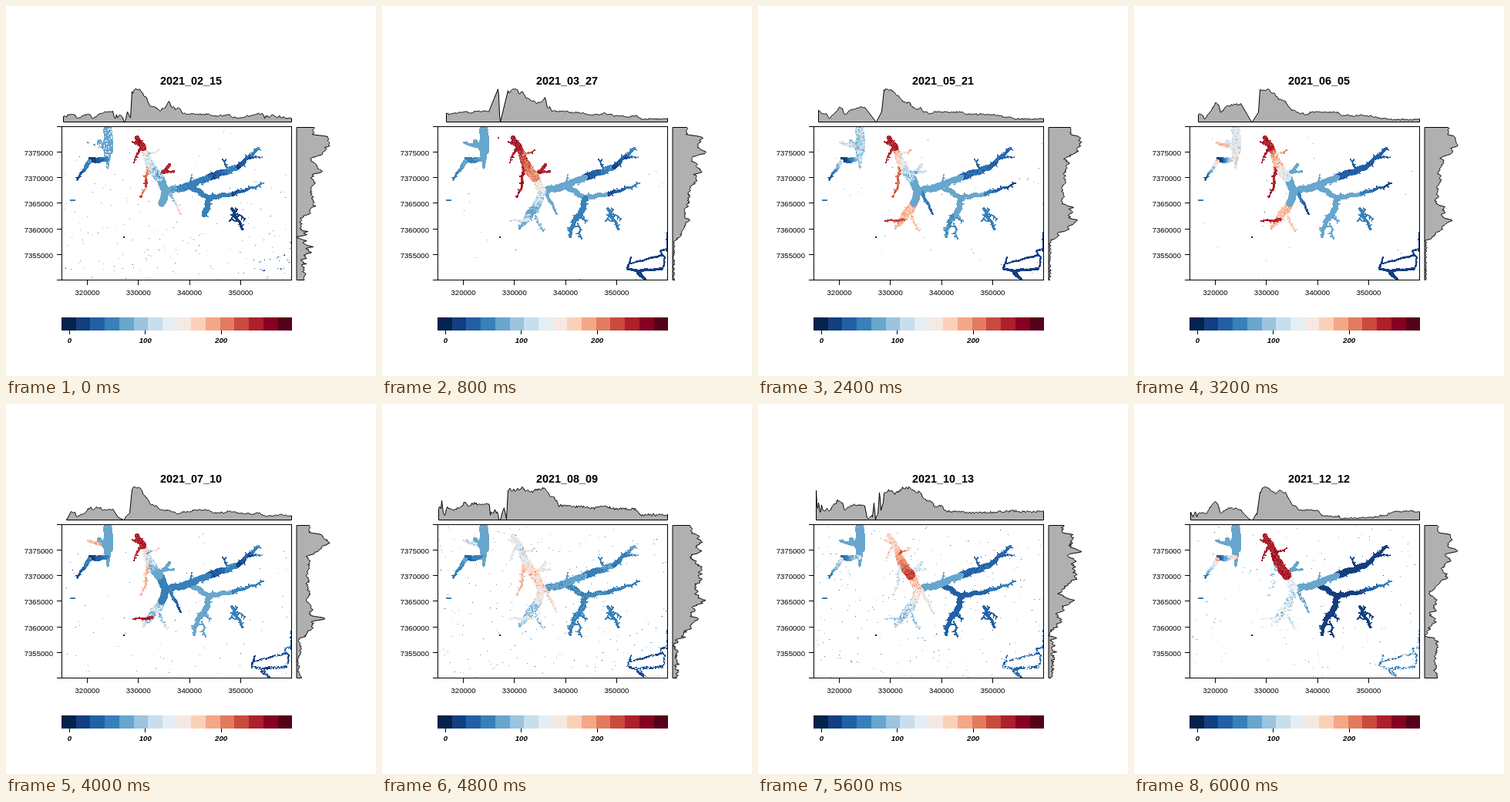
Animation of 480 by 480 pixels, one loop 6.4 s. Source, as an HTML page with a canvas:

```html
<!DOCTYPE html>
<html lang="en">
<head>
<meta charset="utf-8">
<title>Water map time series</title>
<style>
  html, body { margin: 0; width: 100%; height: 100%; overflow: hidden; background: #fff; }
  canvas, svg { position: absolute; left: 0; top: 0; width: 480px; height: 480px; }
  text { font-family: "Liberation Sans", Arial, sans-serif; font-size: 9.6px; text-anchor: middle; }
  #title { font-size: 14.4px; font-weight: bold; }
  .y { text-anchor: end; }
  .key { font-weight: bold; font-style: italic; }
  path { stroke: #000; fill: none; shape-rendering: crispEdges; }
</style>
</head>
<body>
<canvas id="map" width="480" height="480"></canvas>
<svg id="axes" viewBox="0 0 480 480"><text id="title" x="240" y="102"></text></svg>
<script>
const STEP = 400, STEPS = 16;
const ctx = document.getElementById('map').getContext('2d');
const axes = document.getElementById('axes');
const title = document.getElementById('title');
const palette = ['#04224c', '#133f80', '#2260a6', '#3780b9', '#68a6cd', '#9bc4de', '#c7deec', '#e6eef3',
  '#f7e8e1', '#fbd0b9', '#f3a787', '#e27b5e', '#c94a3f', '#ae1f2c', '#850021', '#550019'];

const lerp = (a, b, k) => a + (b - a) * k;
const clamp = (v, lo, hi) => Math.max(lo, Math.min(hi, v));
function hash(x, y, s) {
  const v = Math.sin(x * 12.9898 + y * 78.233 + s * 37.719) * 43758.5453;
  return v - Math.floor(v);
}

// Water bodies: each line is start width, end width, then x,y points.
const cells = new Map();
function stamp(x, y, w, name, t) {
  const r = w / 2;
  for (let j = Math.floor(y - r); j <= y + r; j++)
    for (let i = Math.floor(x - r); i <= x + r; i++)
      if (i > 72 && i < 371 && j > 156 && j < 356 && Math.hypot(i + .5 - x, j + .5 - y) <= Math.max(r, .71))
        cells.set(j * 480 + i, { x: i, y: j, name, t });
}
function water(name, rough, ...lines) {
  for (const [w0, w1, ...p] of lines) {
    const n = p.length / 2 - 1;
    let run = 0;
    for (let k = 0; k < n; k++) {
      const [x0, y0, x1, y1] = p.slice(k * 2, k * 2 + 4);
      const len = Math.hypot(x1 - x0, y1 - y0), ux = (x1 - x0) / len, uy = (y1 - y0) / len;
      for (let d = 0; d < len; d += .5) {
        const t = (k + d / len) / n, w = lerp(w0, w1, t);
        const bend = Math.sin(d / len * Math.PI) * Math.sin(d / 3 + x0) * rough * 1.6;
        const x = x0 + ux * d - uy * bend, y = y0 + uy * d + ux * bend;
        const h = hash(Math.floor(x / 2), Math.floor(y / 2), 1);
        stamp(x, y, w * (1 + (h - .5) * .6 * rough), name, t);
        run += .5;
        if (run < 4.5) continue;
        run = 0;
        const side = hash(x, y, 2) < .5 ? -1 : 1, reach = (w * .6 + 1 + hash(x, y, 3) * 4) * rough;
        const lean = hash(x, y, 4) - .5;
        for (let q = 0; q < reach; q += .5)
          stamp(x + (-uy * side + ux * lean) * q, y + (ux * side + uy * lean) * q, q < reach * .6 ? 2 : 1, name, t);
      }
    }
  }
}
water('lake', .35, [10, 13, 132, 157, 133, 187], [11, 2, 132, 187, 132, 211], [6, 6, 121, 176, 129, 186]);
water('spur', .4, [3, 5, 106, 177, 122, 182]);
water('tail', .5, [6, 7, 132, 199, 110, 200], [6, 2, 108, 202, 92, 226]);
water('pond', 0, [1, 1, 84, 252, 90, 252]);
water('dot', 0, [1, 1, 151, 171, 152, 172]);
water('sink', 0, [1, 1, 153, 300, 154, 300]);
water('river', .3, [2, 4, 323, 326, 318, 341, 336, 344], [4, 3, 336, 343, 364, 341], [6, 3, 333, 346, 342, 355],
  [2, 2, 364, 341, 367, 326, 361, 318, 370, 315], [2, 3, 323, 334, 364, 323], [2, 3, 370, 294, 370, 318]);
water('isle', .8, [4, 3, 293, 263, 307, 290], [2, 2, 290, 279, 300, 264], [2, 1, 298, 270, 311, 276]);
water('tip', .6, [5, 2, 290, 245, 311, 239, 334, 230]);
water('arm', .6, [7, 5, 240, 235, 262, 248, 291, 245]);
water('bay', .8, [7, 4, 257, 271, 249, 279, 244, 299], [2, 2, 254, 282, 259, 302], [3, 1, 258, 273, 267, 280]);
water('gulf', .7, [6, 7, 264, 249, 257, 271]);
water('east', .65, [8, 7, 264, 222, 301, 209], [6, 3, 301, 209, 328, 184], [1, 3, 281, 199, 289, 212],
  [3, 1, 316, 197, 333, 196]);
water('mid', .65, [9, 8, 209, 240, 230, 236, 264, 222], [1, 3, 241, 219, 237, 232]);
water('leg', .4, [5, 2, 212, 241, 227, 270]);
water('south', .65, [9, 10, 203, 255, 190, 273], [8, 3, 190, 273, 178, 289], [3, 1, 199, 272, 209, 293]);
water('hook', .5, [4, 2, 190, 277, 165, 279]);
water('fork', .5, [3, 4, 198, 221, 212, 206], [4, 2, 205, 216, 218, 214]);
water('west', .5, [4, 3, 184, 204, 181, 236], [3, 1, 181, 236, 175, 249]);
water('hub', .5, [11, 9, 197, 220, 208, 240, 202, 256]);
water('neck', .6, [8, 11, 178, 184, 186, 204, 198, 222], [1, 3, 198, 187, 183, 194]);
water('head', .5, [6, 8, 170, 171, 178, 184], [1, 3, 166, 203, 173, 186], [2, 4, 164, 176, 176, 181]);

// Levels along a body: start, end, share of cells that show.
const tone = (from, to = from, cover = 1) => ({ from, to, cover });
const NAVY = tone(1), BLUE = tone(3), SKY = tone(4), MIX = tone(7), PEACH = tone(9.4), RED = tone(13);
const DRY = tone(0, 0, 0), DEEPEN = tone(3.6, 1), LIGHTEN = tone(1, 3.4), COOL = tone(9.5, 4), HEAT = tone(4, 11);
const usual = { head: RED, river: NAVY, sink: tone(0), dot: DRY, isle: BLUE, bay: BLUE, tail: DEEPEN, pond: BLUE };

const scenes = [];
const scene = (step, specks, tones) => scenes.push({ step, specks, tones: { ...usual, ...tones } });
scene(0, 170, {
  lake: tone(4, 4, .75), spur: tone(3, 4, .3), neck: tone(9, 5), west: tone(9, 13), fork: RED, south: DRY, hook: DRY,
  leg: tone(4, 9), mid: tone(4, 2.6), east: LIGHTEN, arm: BLUE, tip: LIGHTEN, gulf: BLUE, bay: DRY, isle: NAVY,
  river: tone(1, 2, .18)
});
scene(2, 25, {
  tail: tone(4, 3), neck: tone(13, 10.5), west: RED, fork: RED, hub: tone(9, 5.5), south: tone(5, 4), hook: MIX,
  east: LIGHTEN, tip: LIGHTEN, gulf: BLUE, dot: RED
});
scene(4, 45, {
  lake: tone(4.6, 4), neck: COOL, west: PEACH, fork: HEAT, south: PEACH, hook: tone(10, 13, .7), leg: BLUE, east: BLUE,
  arm: tone(4, 4, .8), tip: DEEPEN, dot: RED
});
scene(8, 22, {
  lake: MIX, spur: PEACH, tail: tone(9, 1), neck: tone(12, 7), west: RED, south: PEACH, hook: RED, leg: DEEPEN,
  east: tone(1.6, 2), tip: DEEPEN, bay: SKY
});
scene(10, 85, {
  spur: PEACH, neck: COOL, west: PEACH, hub: BLUE, south: tone(4.2, 7), hook: RED, leg: DEEPEN, mid: BLUE,
  east: LIGHTEN, tip: BLUE, bay: SKY, river: tone(1, 2, .7)
});
scene(13, 330, {
  head: SKY, neck: HEAT, west: PEACH, fork: PEACH, hub: tone(12, 9.5), south: tone(6, 4), leg: tone(12, 9.5),
  east: tone(3.2, 4), arm: BLUE, tip: BLUE, gulf: BLUE, tail: tone(4, 3), river: tone(2, 1, .7)
});
scene(15, 150, {
  tail: tone(9.5, 2), neck: RED, west: tone(4, 4, .4), hub: tone(8, 6, .6), south: tone(5, 8, .6), hook: tone(6, 9, .5),
  leg: tone(4, 4, .7), east: NAVY, arm: NAVY, tip: LIGHTEN, gulf: NAVY, bay: NAVY, isle: NAVY, river: tone(3, 4, .6)
});

const dates = ['02_15', '03_07', '03_27', '04_16', '05_01', '05_11', '05_21', '05_26', '06_05', '06_20',
  '07_10', '07_25', '08_09', '08_24', '10_13', '12_12'];

// Collects mean levels per row or column and turns them into heights.
class Mean {
  constructor() { this.sum = []; this.count = []; }
  add(i, v, weight) {
    this.sum[i] = (this.sum[i] || 0) + v * weight;
    this.count[i] = (this.count[i] || 0) + weight;
  }
  heights(seed) {
    const keys = Object.keys(this.sum).map(Number);
    const level = keys.map(i => {
      let s = 0, n = 0;
      for (let d = -1; d <= 1; d++) {
        const f = d ? .4 : 1;
        s += (this.sum[i + d] || 0) * f;
        n += (this.count[i + d] || 0) * f;
      }
      return s / n + (hash(i, 6, seed) - .5) * .5;
    });
    const lo = Math.min(...level), hi = Math.max(...level);
    return keys.map((i, n) => [i, (level[n] - lo) / (hi - lo) * 43]);
  }
}

function profile(points, end, place) {
  ctx.beginPath();
  ctx.moveTo(...place(points[0][0], 0));
  for (const [i, h] of points) ctx.lineTo(...place(i, h));
  ctx.lineTo(...place(end, points[points.length - 1][1]));
  ctx.lineTo(...place(end, 0));
  ctx.closePath();
  ctx.fill();
  ctx.stroke();
}

function draw(step) {
  const b = scenes.find(s => s.step >= step);
  const a = scenes[Math.max(0, scenes.indexOf(b) - (b.step > step))];
  const k = a === b ? 0 : (step - a.step) / (b.step - a.step);
  const seed = step + 5, columns = new Mean(), rows = new Mean();
  ctx.fillStyle = '#fff';
  ctx.fillRect(0, 0, 480, 480);
  title.textContent = '2021_' + dates[step];

  const dot = (x, y, level, weight) => {
    const v = clamp(Math.round(level), 0, 15);
    ctx.fillStyle = palette[v];
    ctx.fillRect(x, y, 1, 1);
    columns.add(x, level, weight);
    rows.add(y, level, weight);
  };

  const specks = lerp(a.specks, b.specks, k);
  for (let i = 0; i < specks; i++) {
    const hue = hash(i, 3, seed), low = step < 2 ? .55 : .9;
    ctx.globalAlpha = .35 + .6 * hash(i, 4, seed);
    dot(Math.floor(73 + hash(i, 1, seed) * 297), Math.floor(158 + 197 * hash(i, 2, seed) ** low),
      hue > .9 && step > 10 ? 10 : hue * 4.5, .35);
  }
  ctx.globalAlpha = 1;

  for (const { x, y, name, t } of cells.values()) {
    const p = a.tones[name] || SKY, q = b.tones[name] || SKY;
    const patch = hash(x >> 1, y >> 1, seed);
    if (patch * .6 + hash(x, y, 9) * .4 > lerp(p.cover, q.cover, k)) continue;
    const level = lerp(lerp(p.from, p.to, t), lerp(q.from, q.to, t), k);
    const mottle = level > 4.8 && level < 9 ? 4.5 : level > 9 ? 2.2 : .9;
    dot(x, y, level + (patch * .5 + hash(x, y, seed) * .5 - .5) * mottle, 1);
  }

  ctx.fillStyle = '#b0b0b0';
  ctx.strokeStyle = '#000';
  ctx.lineWidth = 1;
  ctx.lineJoin = 'round';
  profile(columns.heights(seed), 370, (i, h) => [i + .5, 150.5 - h]);
  profile([[157, rows.heights(seed)[0][1]], ...rows.heights(seed)], 355, (i, h) => [377 + h, i + .5]);

  palette.forEach((c, i) => {
    const x = Math.round(72 + i * 18.7);
    ctx.fillStyle = c;
    ctx.fillRect(x, 404, Math.round(72 + (i + 1) * 18.7) - x, 17);
  });
}

function label(text, x, y, cls = '') {
  axes.insertAdjacentHTML('beforeend', `<text x="${x}" y="${y}" class="${cls}">${text}</text>`);
}
let ticks = 'M72.5 156.5H370.5V355.5H72.5Z';
for (let i = 0; i < 7; i++) {
  const y = Math.round(156.7 + i * 33.2);
  ticks += `M66 ${y - .5}H72`;
  if (i > 0 && i < 6) label(7380000 - i * 5000, 61, y + 4, 'y');
}
for (let i = 0; i < 4; i++) {
  const x = 105.5 + i * 66.3;
  ticks += `M${Math.floor(x) + .5} 356V362`;
  label(320000 + i * 10000, x, 375);
}
for (let i = 0; i < 3; i++) {
  const x = 82.5 + i * 98.3;
  ticks += `M${Math.floor(x) + .5} 421V426`;
  label(i * 100, x, 437, 'key');
}
axes.insertAdjacentHTML('beforeend', `<path d="${ticks}"/>`);

let shown = -1;
function tick() {
  const step = Math.floor(performance.now() / STEP) % STEPS;
  if (step !== shown) draw(shown = step);
  requestAnimationFrame(tick);
}
tick();
</script>
</body>
</html>
```
